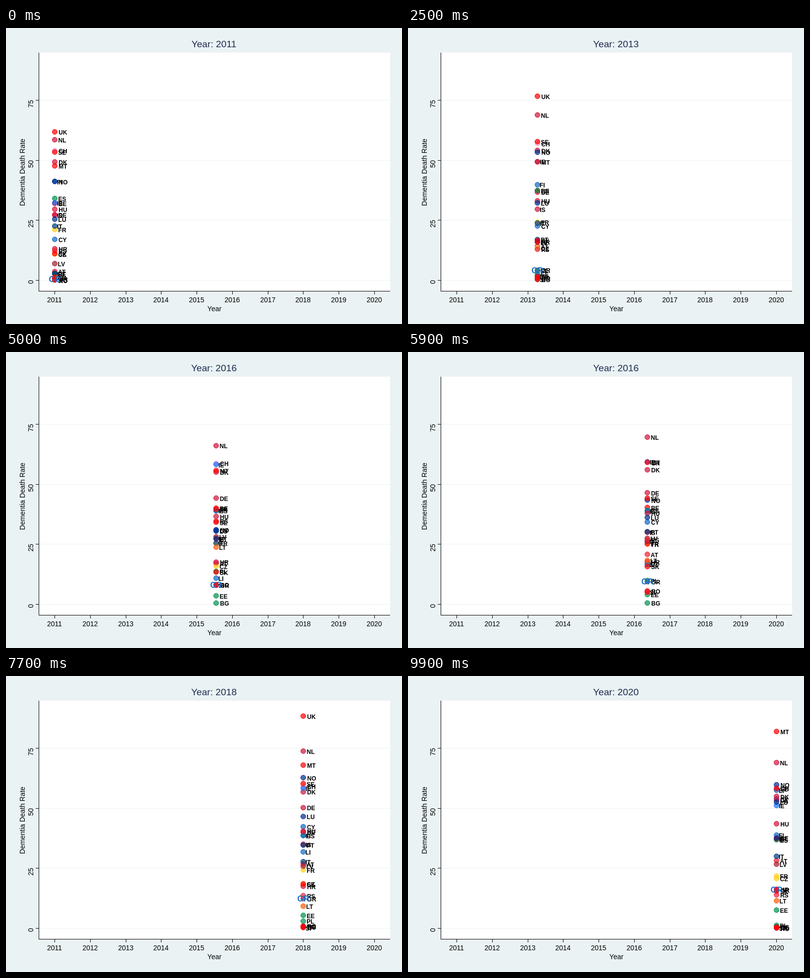
Write an HTML page with a canvas that moves like this. It is 800 px wide and 600 px high and loops after 10000 ms.

```html
<!DOCTYPE html>
<html lang="en">
<head>
<meta charset="utf-8">
<title>Dementia death rate by year</title>
<style>
html, body { margin: 0; width: 100%; height: 100%; overflow: hidden; background: #eaf2f3; }
canvas { display: block; }
</style>
</head>
<body>
<canvas id="chart" width="800" height="600"></canvas>
<script>
const ctx = document.getElementById('chart').getContext('2d');
const FONT = '"Liberation Sans", Arial, sans-serif';
const PAPER = '#eaf2f3';
const YEAR_W = 71.77, X0 = 98.5, ZERO_Y = 511;
const STEP_MS = 100, STEPS = 100, STEPS_PER_YEAR = 11;

const RED = '#ff0000', CRIMSON = '#d2143a', ROSE = '#ee2436', WINE = '#a5202f';
const GREEN = '#009150', BLUE = '#1268c8', SKY = '#1a70ff', NAVY = '#00308f';
const YELLOW = '#ffd21a', ORANGE = '#ff5a0a', PINK = '#f4a0cc';

// Each country drifts from one height to another; "bow" bends its whole path,
// "peak" adds a swing that is strongest halfway.
const countries = [];
const add = (code, color, from, to, bow = 0, peak = 0) =>
  countries.push({ code, color, from, to, bow, peak });

add('AT', ROSE, 493.5, 374, -28, 24);
add('BE', RED, 355.5, 328, -25);
add('BG', GREEN, 510, 508);
add('CH', PINK, 248.5, 227, -12);
add('CY', BLUE, 428.5, 249, 24);
add('CZ', YELLOW, 458, 410.5);
add('DE', CRIMSON, 378.5, 251, -18);
add('DK', CRIMSON, 271.5, 244, -22, 8);
add('EE', GREEN, 498, 474.5, 8);
add('ES', GREEN, 345.5, 332, -17);
add('FI', BLUE, 311, 322.5, 5);
add('FR', YELLOW, 408.5, 405.5, -19);
add('GR', CRIMSON, 508.5, 433, 2);
add('HR', CRIMSON, 447.5, 432.5, -14);
add('HU', CRIMSON, 367.5, 299.5);
add('IE', SKY, 354.5, 262.5, -80);
add('IS', CRIMSON, 379.5, 330, 0, 25);
add('IT', '#003c82', 401.5, 365.5, 4);
add('LI', BLUE, 498, 231.5, 95);
add('LT', ORANGE, 505, 455.5, 0, -86);
add('LU', NAVY, 387.5, 255.5, 0, 43);
add('LV', WINE, 477.5, 381.5, -25, -30);
add('MT', RED, 279.5, 112.5, 45);
add('NL', CRIMSON, 226.5, 175.5, -50, 40);
add('NO', NAVY, 311, 220.5, -50, 148);
add('PL', GREEN, 498, 505.5, -10, -48);
add('PT', '#002f78', 497, 329, -34);
add('RO', CRIMSON, 511, 511, -6, -34);
add('RS', ROSE, 451.5, 443.5, 0, -107);
add('SE', RED, 251.5, 228, -22, 130);
add('SI', RED, 510, 510, 0, -38);
add('SK', RED, 457.5, 436, -28, 28);
add('TR', RED, 505, 509, 0, -192);
add('UK', RED, 210.5, 95, -57);

// The UK has no figures for 2016 and 2020.
const missing = (code, years) =>
  code === 'UK' && (Math.abs(years - 5) < 1 || years > 8);

function heightAt({ from, to, bow, peak }, t) {
  const swing = Math.max(0, 1 - 4 * Math.abs(t - 0.5));
  return from + (to - from) * t + bow * 4 * t * (1 - t) + peak * swing;
}

function rect(color, x, y, w, h) {
  ctx.fillStyle = color;
  ctx.fillRect(x, y, w, h);
}

function text(str, x, y, size, { color = '#000', align = 'center', bold = false, turned = false } = {}) {
  ctx.save();
  ctx.translate(x, y);
  if (turned) ctx.rotate(-Math.PI / 2);
  ctx.font = `${bold ? 'bold ' : ''}${size}px ${FONT}`;
  ctx.textAlign = align;
  ctx.fillStyle = color;
  ctx.fillText(str, 0, 0);
  ctx.restore();
}

function drawAxes(year) {
  rect(PAPER, 0, 0, 800, 600);
  rect('#fff', 66, 50, 710, 484);
  for (let rate = 0; rate <= 75; rate += 25) {
    const y = Math.round(ZERO_Y - rate * 4.867);
    rect(PAPER, 67, y, 709, 1);
    rect('#000', 60, y, 6, 1);
    text(rate, 55, y, 14, { align: 'right', turned: true });
  }
  for (let i = 0; i < 10; i++) {
    const x = Math.floor(X0 + i * YEAR_W);
    rect('#000', x, 534, 1, 6);
    text(2011 + i, x, 556, 14);
  }
  rect('#000', 66, 50, 1, 484);
  rect('#000', 66, 533, 710, 1);
  text('Year', 421, 574, 14);
  text('Dementia Death Rate', 38, 292.5, 14.2, { turned: true });
  text('Year: ' + year, 420, 39, 19.2, { color: '#1e2d53' });
}

function drawDot(x, y, color) {
  ctx.beginPath();
  ctx.arc(x, y, 5, 0, 2 * Math.PI);
  ctx.fillStyle = ctx.strokeStyle = color;
  ctx.globalAlpha = 0.7;
  ctx.fill();
  ctx.globalAlpha = 1;
  ctx.stroke();
}

function drawLabel(x, y, code) {
  ctx.font = `bold 12px ${FONT}`;
  const shift = ctx.measureText(code).width / 2 - 0.9;
  text(code, x + shift, y + 5.5, 12, { align: 'left', bold: true });
}

function draw(now) {
  const step = Math.floor(now / STEP_MS) % STEPS;
  const years = step / STEPS_PER_YEAR;
  const x = Math.floor(X0 + years * YEAR_W) + 0.5;
  const shown = countries
    .filter(c => !missing(c.code, years))
    .map(c => ({ ...c, y: heightAt(c, step / (STEPS - 1)) }));

  drawAxes(2011 + Math.round(years));
  shown.forEach(c => drawDot(x, c.y, c.color));
  shown.forEach(c => drawLabel(x, c.y, c.code));
  const greece = shown.find(c => c.code === 'GR');
  text('GR', x, greece.y + 6, 16, { color: '#1a6fc4', bold: true });
}

const start = performance.now();
function tick() {
  draw(performance.now() - start);
  requestAnimationFrame(tick);
}
tick();
</script>
</body>
</html>
```
